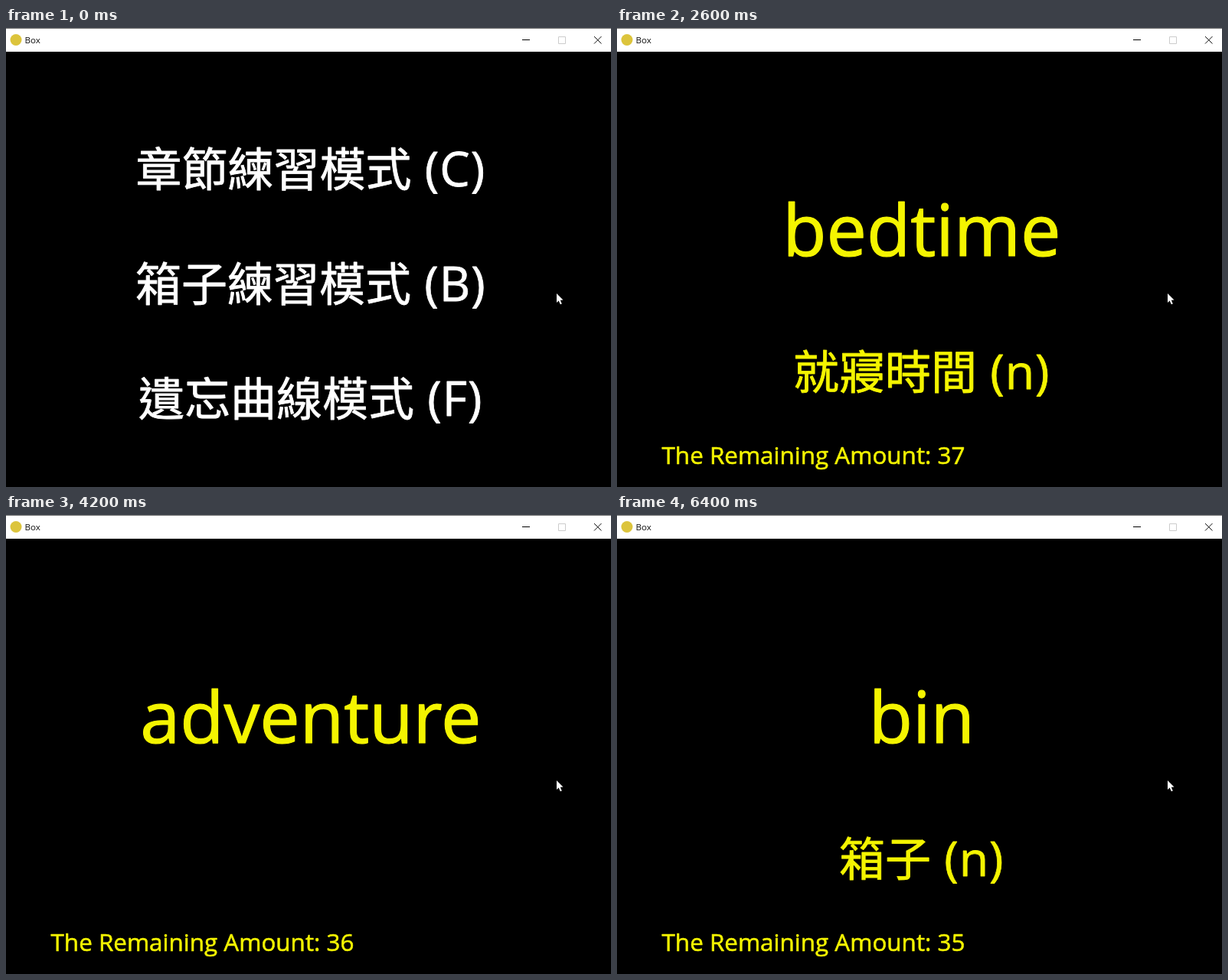
An HTML page with a canvas for the animation above (6.8 s loop, 790x600 px).

```html
<!DOCTYPE html>
<html lang="zh-Hant">
<head>
<meta charset="utf-8">
<title>Box</title>
<style>
  html, body { margin: 0; width: 100%; height: 100%; overflow: hidden; background: #000; }
  canvas { display: block; }
</style>
</head>
<body>
<canvas id="stage" width="790" height="600"></canvas>
<script>
const ctx = document.getElementById('stage').getContext('2d');
const LOOP = 6800;
const MID = 397.8;
const WHITE = '#fff';
const YELLOW = '#f4f400';
const LATIN = '"Open Sans", "Noto Sans", sans-serif';
const HAN = '"Noto Sans CJK TC", "Noto Sans CJK JP", sans-serif';

// Each scene starts at a time and lasts until the next one.
const scenes = [
  [0, drawMenu],
  [600, () => drawPrompt('')],
  [1200, () => drawPrompt('1')],
  [1800, () => drawCard('bedtime', 37)],
  [2400, () => drawCard('bedtime', 37, '就寢時間 (n)')],
  [3000, () => drawCard('atmosphere', 36)],
  [3600, () => drawCard('atmosphere', 36, '大氣層、氣氛 (n)')],
  [4200, () => drawCard('adventure', 36)],
  [5000, () => drawCard('adventure', 36, '歷險、冒險 (n)')],
  [5600, () => drawCard('bin', 35)],
  [6200, () => drawCard('bin', 35, '箱子 (n)')]
];

function setFont(size, family, spacing = 0) {
  ctx.font = `${size}px ${family}`;
  ctx.letterSpacing = `${spacing}px`;
}

// Fill plus a thin outline gives a slightly heavier weight.
function ink(text, x, y, weight) {
  ctx.fillText(text, x, y);
  ctx.lineWidth = weight;
  ctx.strokeText(text, x, y);
}

function setColor(color) {
  ctx.fillStyle = ctx.strokeStyle = color;
}

// Han characters and Latin letters use different sizes on one line.
function drawLine(text, y, color, left) {
  setColor(color);
  const cut = text.indexOf(' ');
  const han = text.slice(0, cut);
  const latin = text.slice(cut);
  const hanWidth = han.length * 60;
  setFont(62.5, LATIN, 1);
  const x = left ?? MID - (hanWidth + ctx.measureText(latin).width) / 2;
  ink(latin, x + hanWidth, y, 0.8);
  setFont(60, HAN);
  ink(han, x, y - 0.5, 0.8);
}

function drawMenu() {
  ['章節練習模式 (C)', '箱子練習模式 (B)', '遺忘曲線模式 (F)']
    .forEach((text, i) => drawLine(text, 207 + i * 150, WHITE));
}

function drawPrompt(input) {
  drawLine('請輸入練習章節 :', 207, WHITE, 166);
  const x = 348.5 - input.length * 17;
  setFont(66, LATIN);
  ink('>', x, 361, 0.8);
  ink('>', x + 45, 361, 0.8);
  setFont(62.5, LATIN);
  ink(input, x + 97, 357, 0.8);
}

function drawCard(word, left, meaning) {
  setColor(YELLOW);
  setFont(93.5, LATIN);
  ctx.textAlign = 'center';
  ink(word, MID, 298, 1.2);
  ctx.textAlign = 'left';
  setFont(31.4, LATIN);
  ink(`The Remaining Amount: ${left}`, 58.5, 570, 0.6);
  if (meaning) drawLine(meaning, 472, YELLOW);
}

function segment(color, ...points) {
  ctx.strokeStyle = color;
  ctx.lineWidth = 1;
  ctx.beginPath();
  for (const [x1, y1, x2, y2] of points) {
    ctx.moveTo(x1, y1);
    ctx.lineTo(x2, y2);
  }
  ctx.stroke();
}

function drawWindow() {
  ctx.fillStyle = '#000';
  ctx.fillRect(0, 0, 790, 600);
  ctx.fillStyle = WHITE;
  ctx.fillRect(0, 0, 790, 31);
  ctx.fillStyle = '#777';
  ctx.fillRect(0, 0, 790, 1);

  ctx.fillStyle = '#dcc43c';
  ctx.beginPath();
  ctx.arc(13, 15.5, 7.5, 0, Math.PI * 2);
  ctx.fill();

  ctx.fillStyle = '#111';
  setFont(11.6, LATIN);
  ctx.fillText('Box', 24.5, 20);

  segment('#000', [674, 15.5, 684, 15.5]);
  ctx.strokeStyle = '#ccc';
  ctx.strokeRect(721.5, 11.5, 9, 9);
  segment('#111', [768, 11, 777.5, 20.5], [777.5, 11, 768, 20.5]);
}

function drawCursor() {
  const outline = [[0, 0], [0, 12], [2.7, 9.5], [4.8, 14.3], [6.8, 13.4], [4.8, 8.7], [8.5, 8.5]];
  ctx.fillStyle = WHITE;
  ctx.beginPath();
  outline.forEach(([x, y]) => ctx.lineTo(719 + x, 347 + y));
  ctx.fill();
}

function render() {
  const t = performance.now() % LOOP;
  drawWindow();
  scenes.findLast(([start]) => t >= start)[1]();
  drawCursor();
  requestAnimationFrame(render);
}

ctx.lineJoin = 'round';
render();
</script>
</body>
</html>
```
